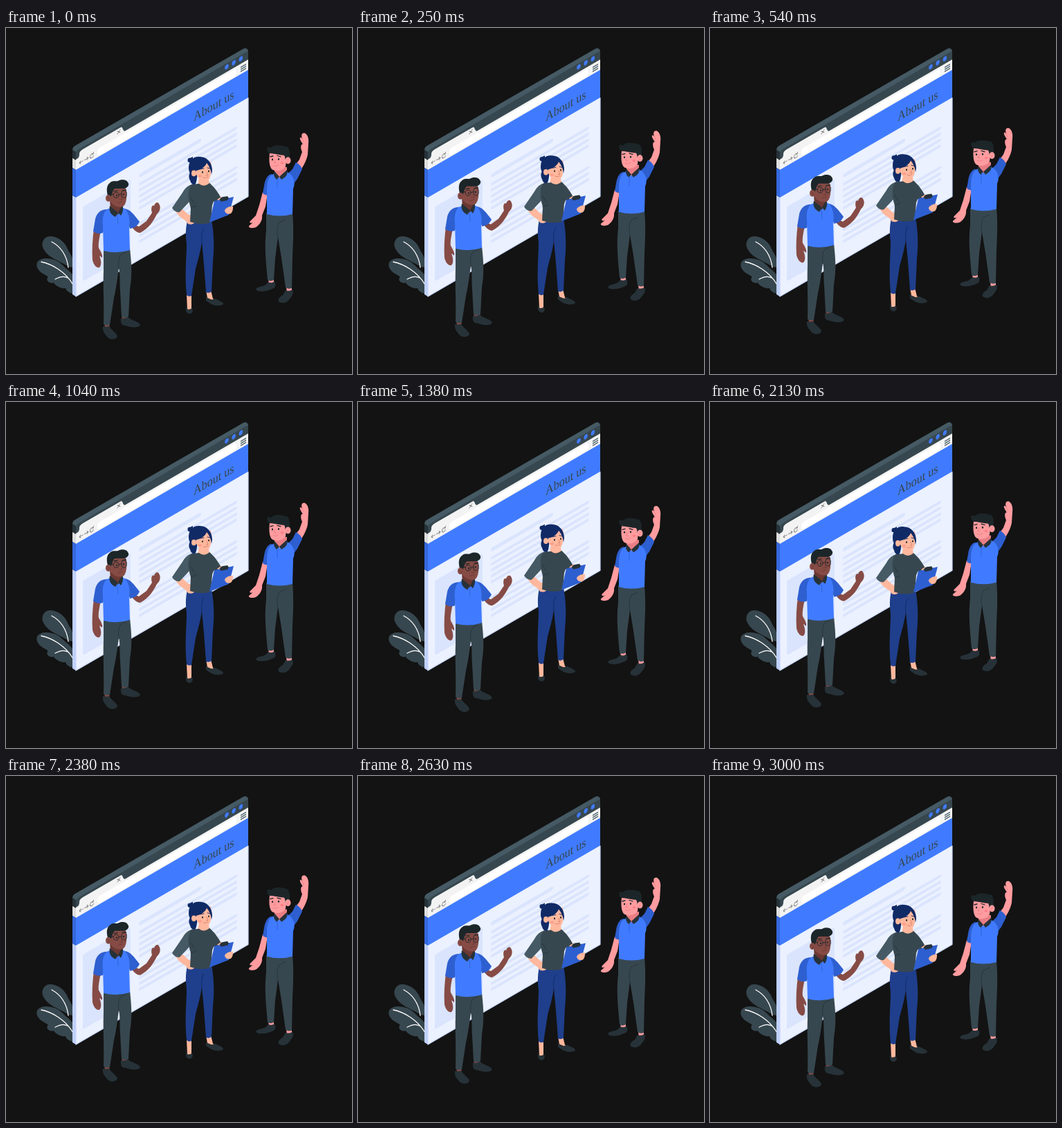
Animation, 500 px wide and 500 px high, one loop 3040 ms. Source, as an HTML page with a canvas:

```html
<!DOCTYPE html>
<html lang="en">
<head>
<meta charset="utf-8">
<title>About us</title>
<style>
html, body { margin: 0; width: 100%; height: 100%; overflow: hidden; background: #131313; }
canvas { display: block; width: 100vmin; height: 100vmin; }
</style>
</head>
<body>
<canvas id="stage" width="500" height="500"></canvas>
<script>
const ctx = document.getElementById('stage').getContext('2d');
const LOOP = 3040, RISE = 10, SLOPE = 0.58;
const C = {
  bg: '#131313', ink: '#263238', slate: '#37474f', steel: '#455a64',
  blue: '#407bff', mid: '#2e5fd0', navy: '#1f3f8c', hair: '#102a66',
  page: '#ebf1ff', band: '#dae4fd', brown: '#864b45', brownDark: '#6b3833',
  peach: '#ffb89d', pink: '#ff9c9f', pinkDark: '#e97f85', black: '#1c2629'
};

function fill(color, d) {
  ctx.fillStyle = color;
  ctx.fill(new Path2D(d));
}

function line(color, width, d) {
  ctx.strokeStyle = color;
  ctx.lineWidth = width;
  ctx.stroke(new Path2D(d));
}

function oval(color, x, y, rx, ry, turn = 0) {
  ctx.fillStyle = color;
  ctx.beginPath();
  ctx.ellipse(x, y, rx, ry, turn, 0, 7);
  ctx.fill();
}

function box(color, x, y, w, h, r = 0) {
  ctx.fillStyle = color;
  ctx.beginPath();
  ctx.roundRect(x, y, w, h, r);
  ctx.fill();
}

function drawPlant() {
  fill(C.slate, 'M97 346C91 346 84 341 76 337C66 332 58 327 54 319C50 311 54 302 63 301C75 301 85 309 89 319C91 325 97 329 97 340Z');
  fill(C.slate, 'M98 384C89 383 87 378 86 376C80 377 72 373 69 368C65 370 57 366 60 361C62 358 57 358 52 354C46 350 43 344 45 339C48 333 58 332 66 334C78 336 83 345 90 350L98 358Z');
  line('#fff', 1.3, 'M66 309C78 315 88 328 90 346M51 338C66 341 86 352 97 371M71 363C78 359 84 358 89 361');
}

function drawWindow() {
  // side and top thickness
  fill(C.steel, 'M96 178C96 173 97 172 100 170L343 30C347 28 350 30 350 35L101 183Z');
  fill(C.ink, 'M96 176L101 179V191L96 188Z');
  fill('#dedede', 'M96 188L101 191V205L96 202Z');
  fill('#3468dd', 'M96 202L101 205V245L96 242Z');
  fill('#bfd0fb', 'M96 242L101 245V388L96 385Z');

  // front face, drawn flat in the slanted plane
  ctx.save();
  ctx.transform(1, -SLOPE, 0, 1, 101, 0);
  box(C.slate, 0, 177.5, 249, 15, [4, 3, 0, 0]);
  box('#f3f3f3', 0, 190, 249, 16);
  fill('#f3f3f3', 'M1 191C5 190 5 187 5 185C5 182 7 181 10 181H64C67 181 67 183 68 186C69 189 70 190 73 191Z');
  box('#fff', 31, 193, 201, 10, 4);
  box(C.blue, 0, 205, 249, 41);
  box(C.page, 0, 245, 249, 143);
  box(C.band, 10, 264, 69, 108, 3);
  box(C.band, 91, 264, 90, 5.5, 2.7);
  for (let i = 0; i < 5; i++) box(C.band, 91, 277 + i * 8.6, i < 4 ? 142 : 100, 4.2, 2);
  for (let i = 0; i < 4; i++) box(C.band, 91, 334 + i * 8.6, i < 3 ? 142 : 112, 4.2, 2);
  for (let i = 0; i < 3; i++) box(C.steel, 238, 194.3 + i * 3, 8, 1.4);
  line('#777', 0.9, 'M60 184L64 188M64 184L60 188');
  line('#777', 0.8, 'M10.5 198H5M7 196L5 198L7 200M12.5 198H18M16 196L18 198L16 200M25 196A2.6 3 0 1 0 25.5 199M25.3 194V196.5H23');
  for (let i = 0; i < 3; i++) oval(C.blue, 218 + i * 10.2, 182.6, 2.8, 3.4);
  ctx.restore();
  line('#c9d8ff', 1.2, 'M101 245V388L350 243.5V101');

  ctx.save();
  ctx.transform(0.866, -0.502, 0, 1, 271, 135);
  ctx.fillStyle = C.slate;
  ctx.font = '18.6px "Liberation Serif", Times, serif';
  ctx.fillText('About us', 0, 0);
  ctx.restore();
}

function drawLeftMan() {
  // shoes and ankles
  fill(C.brown, 'M142 424H150L149 435L143 434ZM167 413H176L175 424L168 422Z');
  fill(C.ink, 'M140 431C144 433 148 430 150 432C152 437 161 441 161 446C158 451 150 451 146 446C143 442 139 439 140 431Z');
  fill(C.ink, 'M166 419C170 421 174 418 177 418C181 423 191 423 194 429C192 434 179 433 173 430C169 430 165 429 166 419Z');
  // trousers
  fill(C.slate, 'M141 319L179 319C182 345 182 359 179 378L177 417Q171 420 167 417L165 380C164 365 165 354 163 347C161 362 159 378 156 390L150 429Q145 431 141 428C142 400 140 374 141 350Z');
  line(C.ink, 0.8, 'M163 348C162 338 163 331 166 327L173 324');
  // far arm
  fill(C.brown, 'M180 282L192 287L203 279L211 267C209 260 211 255 214 257C215 252 220 251 221 254C224 258 223 265 218 269C213 279 207 289 194 296C188 296 183 290 180 284Z');
  fill(C.mid, 'M171 261C180 262 185 270 193 280C190 286 186 289 179 290Z');
  // near arm
  fill(C.brown, 'M127 290L137 293C135 303 133 312 134 318C137 323 140 328 139 332L135 329C138 337 138 343 135 346C131 348 126 341 125 335C124 321 125 305 127 290Z');
  fill(C.mid, 'M147 262C136 262 131 268 129 276L126 294Q133 299 140 296L146 274Z');
  // shirt
  fill(C.blue, 'M148 261C141 264 139 274 140 285L141 322Q160 327 179 321L178 288C180 277 177 264 170 260Z');
  line(C.mid, 0.8, 'M161 271L162 283');
  // neck, collar, head
  fill(C.brownDark, 'M150 249H169V262L161 270L151 262Z');
  fill(C.ink, 'M150 257L162 267L158 273C152 270 148 265 150 257ZM168 256L162 267L166 271C169 266 170 261 168 256Z');
  fill(C.brown, 'M149 231C157 225 171 227 174 234C175 244 174 255 169 258C161 261 152 255 149 248Z');
  fill(C.black, 'M147 242C145 234 145 227 151 223C155 220 159 222 162 221C166 218 175 219 176 223C179 226 176 231 171 232L157 232C154 235 154 238 152 243L149 245Z');
  oval(C.brown, 148, 246, 4, 5);
  line(C.brownDark, 0.8, 'M147 244Q150 246 149 249');
  line(C.black, 0.9, 'M155 241A4 4 0 1 0 163 242A4 4 0 1 0 155 241M167 240A3.7 4 0 1 0 174 240A3.7 4 0 1 0 167 240M163 241L167 240M155 240L149 241');
  line(C.black, 1.2, 'M156 236L161 235M168 235L173 234');
  oval(C.black, 160, 242, 1, 1.3);
  oval(C.black, 170, 240.5, 1, 1.3);
  line(C.brownDark, 0.9, 'M166 241L168 248L164 248M162 253L168 251');
}

function drawWoman() {
  // feet
  fill(C.peach, 'M261 384H268L268 406L262 407ZM289 379H296L299 391L307 397L291 390Z');
  fill(C.ink, 'M261 402C262 409 267 409 268 404C271 407 270 413 265 413C260 412 259 407 261 402ZM289 388C294 395 300 392 302 391C307 394 315 396 314 399C310 403 299 401 295 398L289 394Z');
  // trousers
  fill(C.navy, 'M262 278L297 277C301 299 301 320 299 337L297 381Q293 384 289 382L286 341L283 309C281 323 278 333 274 348L268 387Q264 389 261 386C258 356 261 331 261 312C259 297 260 288 262 278Z');
  line(C.hair, 0.9, 'M283 310C282 300 283 294 286 290');
  // arm on hip
  fill(C.peach, 'M245 260L253 260L264 270C270 270 274 274 274 279C273 283 267 285 263 283L259 278C252 274 247 269 245 264Z');
  fill(C.steel, 'M270 226C263 227 259 231 255 238L240 260Q244 267 251 266L266 250Z');
  // body
  fill(C.peach, 'M279 216H292L295 228Q288 236 277 228Z');
  fill(C.slate, 'M268 226L279 225Q286 231 294 224C300 228 302 236 303 243L298 256L296 281Q281 286 266 280L267 260C263 248 262 233 268 226Z');
  line(C.ink, 0.8, 'M267 245L272 253M267 260L275 257');
  // clipboard and holding arm
  fill(C.slate, 'M293 225C302 229 306 238 312 247L306 253L296 249Z');
  fill(C.peach, 'M305 248L311 244L320 248L316 255Z');
  fill(C.ink, 'M308 249C311 243 319 242 322 247L319 252Z');
  fill(C.mid, 'M301 250L329 244L322 270L294 281Z');
  fill(C.ink, 'M309 248L311 245L320 243L322 246L320 249L311 251Z');
  fill(C.peach, 'M328 258C323 257 316 261 316 264C317 268 321 270 325 268C328 265 328 261 328 258Z');
  // head
  fill(C.hair, 'M271 205C264 207 263 216 266 220C267 225 271 228 274 225C276 221 276 214 277 209Z');
  oval(C.hair, 265.5, 191, 3, 3.2);
  fill(C.hair, 'M266 188L270 186L270 196Z');
  fill(C.peach, 'M272 196L296 193C298 204 297 216 292 220C284 224 275 216 274 208Z');
  fill(C.hair, 'M264 202C264 191 271 185 280 186C291 186 298 195 298 206L297 212C296 203 293 199 290 195C288 201 281 205 275 206L273 213C267 213 264 209 264 202Z');
  oval(C.peach, 271.5, 210, 3.5, 4.4);
  oval(C.black, 284, 208.5, 1, 1.4);
  oval(C.black, 293, 207, 1, 1.4);
  line(C.hair, 0.9, 'M281 204L286 203M291 202L295 203');
  line('#d9806d', 0.9, 'M290 208L292 213L289 213M285 216Q289 218 292 215');
  oval('#ff9c8a', 280.5, 214, 2.6, 1.8);
}

function drawRightMan() {
  // shoes and ankles
  fill(C.pink, 'M379 361H387L387 373L380 372ZM405 373H413L413 383L406 384Z');
  fill(C.ink, 'M379 367C382 369 386 368 388 366C390 370 390 374 387 376C380 379 373 382 364 380C359 378 362 375 367 374C373 373 376 371 379 367Z');
  fill(C.ink, 'M404 379C408 381 412 379 414 378C416 382 414 387 411 390C407 397 400 399 395 396C391 393 396 388 400 386Z');
  // trousers
  fill(C.slate, 'M376 267L414 267C416 290 415 309 414 329L413 376Q408 378 404 375L398 332L393 302L389 333L387 364Q382 367 378 364C376 340 373 316 376 292Z');
  line(C.ink, 0.8, 'M393 303C391 294 392 287 395 281L404 277');
  // lowered arm
  fill(C.pink, 'M371 237L378 239L375 258L370 271C371 278 366 285 361 288C356 290 350 289 351 286L357 281C353 283 351 281 353 279L361 271L366 256Z');
  fill(C.mid, 'M384 211C377 212 374 221 373 228L371 239Q376 243 381 241L386 222Z');
  // raised arm
  fill(C.pink, 'M416 201L424 190L428 179C425 173 426 167 429 168C426 163 423 159 426 158L428 160C426 154 428 151 432 152C436 154 438 160 437 167L436 183C434 193 428 203 422 210Z');
  line(C.pinkDark, 0.7, 'M428 160L430 165');
  fill(C.mid, 'M407 211L414 204L419 194Q426 198 428 204L421 218L412 230Z');
  // shirt
  fill(C.blue, 'M386 211C379 214 377 224 377 236L377 269Q395 274 414 269L415 232C419 224 416 212 406 208Z');
  line(C.mid, 0.8, 'M392 218L392 231');
  // neck, collar, head
  fill(C.pinkDark, 'M388 201H406V209L395 217L388 210Z');
  fill(C.ink, 'M388 207L395 215L391 219C387 215 386 211 388 207ZM406 205L395 215L398 219C405 215 408 211 406 205Z');
  fill(C.pink, 'M381 181C388 176 402 176 406 183L404 200C400 207 389 208 384 204C380 199 380 189 381 181Z');
  fill(C.black, 'M380 181C377 178 376 173 379 172L383 173C389 167 400 170 407 172C411 177 410 184 410 191L406 195C403 192 404 187 402 184C396 184 387 181 380 181Z');
  oval(C.pink, 407.5, 191.5, 4, 5);
  line(C.pinkDark, 0.8, 'M409 189Q406 190 407 194');
  oval(C.black, 385, 190, 1.1, 1.5);
  oval(C.black, 394, 189.5, 1.1, 1.5);
  line(C.black, 1.3, 'M382 186L386 185M392 184.5L397 186');
  line(C.pinkDark, 0.9, 'M389 190L387 195L390 195M386 199Q390 201 394 198');
  oval('#ff8088', 399, 195, 2.4, 1.8);
}

// linear up and down, starting at the lowest point
const lift = (t, period) => RISE * (1 - Math.abs(1 - 2 * (t % period) / period));

function float(draw, dy) {
  ctx.save();
  ctx.translate(0, -dy);
  draw();
  ctx.restore();
}

function render(now) {
  const step = 1000 / 24;
  const t = Math.floor((now % LOOP + 5) / step) * step;
  box(C.bg, 0, 0, 500, 500);
  ctx.lineCap = ctx.lineJoin = 'round';
  drawPlant();
  drawWindow();
  float(drawLeftMan, lift(t, 1500));
  float(drawWoman, lift(t, 3000));
  float(drawRightMan, lift(t, 1500));
}

let start = null;
function tick(now) {
  if (start === null) start = now;
  render(now - start);
  requestAnimationFrame(tick);
}
render(0);
requestAnimationFrame(tick);
</script>
</body>
</html>
```
